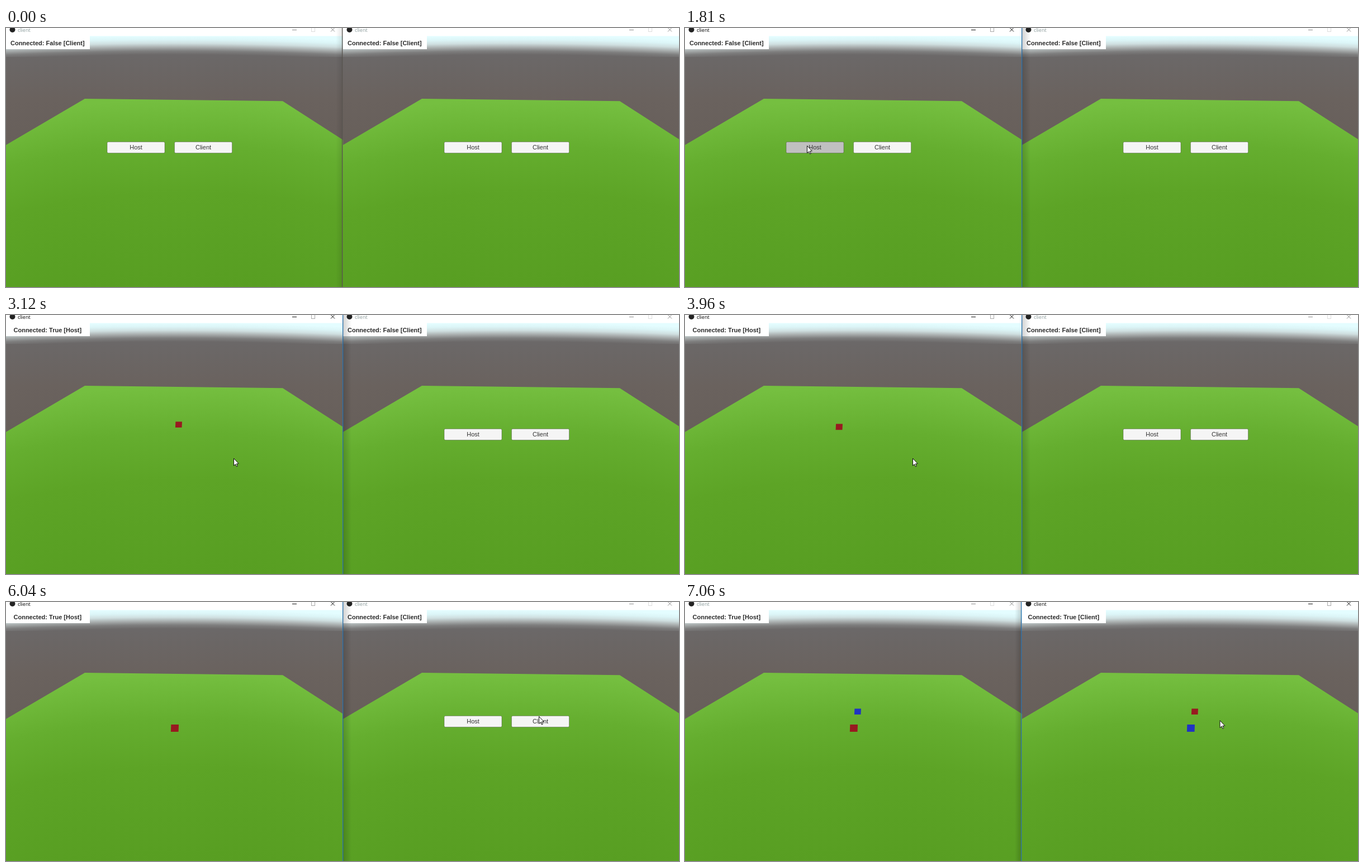
These frames come from a looping animation (1204 px wide and 465 px high, 8 s). An HTML page with a canvas:

```html
<!DOCTYPE html>
<html lang="en">
<head>
<meta charset="utf-8">
<title>Host and client</title>
<style>
html, body { margin: 0; width: 100%; height: 100%; overflow: hidden; }
canvas { display: block; }
</style>
</head>
<body>
<canvas id="stage" width="1204" height="465"></canvas>
<script>
const ctx = document.getElementById('stage').getContext('2d');
const LOOP = 8000, STEP = 77, PANE = 603, HEIGHT = 465;
const SANS = '"Liberation Sans", Arial, sans-serif';
const RED = '#981a20', BLUE = '#2034c2';
const SPAWN = { x: 309, y: 196.7 };

const clamp = v => Math.min(1, Math.max(0, v));
const progress = (t, from, to) => clamp((t - from) / (to - from));

// Runs the moves one after another; the point rests between them.
function travel(point, t, moves) {
  return moves.reduce((p, { from, to, x, y }) => {
    const f = progress(t, from, to);
    return { x: p.x + (x - p.x) * f, y: p.y + (y - p.y) * f };
  }, point);
}

const cursorAt = t => travel({ x: 662, y: 336 }, t, [
  { from: 270, to: 430, x: 220.5, y: 221 },
  { from: 500, to: 730, x: 218.5, y: 211.5 },
  { from: 2350, to: 2730, x: 935, y: 333 },
  { from: 2730, to: 3115, x: 407.5, y: 257.5 },
  { from: 5480, to: 6040, x: 953.5, y: 205.5 },
  { from: 6270, to: 6590, x: 957, y: 212.8 }
]);

const playerAt = t => travel(SPAWN, t, [
  { from: 3350, to: 4100, x: 268.6, y: 201.8 },
  { from: 4100, to: 4400, x: 256.5, y: 209 },
  { from: 4400, to: 5115, x: 291.3, y: 225 },
  { from: 5115, to: 5420, x: 302, y: 226.5 }
]);

function poly(points, fill) {
  ctx.beginPath();
  points.forEach(([x, y]) => ctx.lineTo(x, y));
  ctx.closePath();
  ctx.fillStyle = fill;
  ctx.fill();
}

function rect(x, y, w, h, fill) {
  ctx.fillStyle = fill;
  ctx.fillRect(x, y, w, h);
}

function text(str, x, y, font, color, align = 'center') {
  ctx.font = font;
  ctx.fillStyle = color;
  ctx.textAlign = align;
  ctx.fillText(str, x, y);
}

// Spreads the colours evenly over the gradient.
function shade(gradient, ...colors) {
  colors.forEach((c, i) => gradient.addColorStop(i / (colors.length - 1), c));
  return gradient;
}

// Arcs around a far centre give the slightly bent bands.
const rings = (x, y, near, far) => ctx.createRadialGradient(x, y, y - near, x, y, y - far);
const sky = shade(rings(300, 6448, 48, 14),
  '#6b6868', '#7e7e7e', '#a9aeae', '#cfdfe0', '#dcf5f7', '#e4fdff');
const ground = shade(ctx.createLinearGradient(0, 48, 0, 210), '#6b6868', '#6a625e', '#675f5a');
const grass = shade(rings(320, 1600, HEIGHT, 127),
  '#589e22', '#5aa124', '#5da426', '#65ae2f', '#75bf40');

function titleBar(active) {
  const ink = active ? '#111' : '#8c8c8c';
  rect(0, 0, PANE, 14.5, '#fff');
  ctx.beginPath();
  ctx.arc(11.5, 3, 5, 0, 2 * Math.PI);
  ctx.fillStyle = '#222';
  ctx.fill();
  text('client', 21, 6.5, '9px "Open Sans", sans-serif', active ? '#000' : '#8a9a9a', 'left');
  rect(512, 3, 8, 1, ink);
  ctx.lineWidth = 1;
  ctx.strokeStyle = active ? '#aaa' : '#ddd';
  ctx.strokeRect(546.5, -.5, 6, 7);
  ctx.strokeStyle = ink;
  ctx.beginPath();
  ctx.moveTo(581, -.5); ctx.lineTo(588, 6.5);
  ctx.moveTo(588, -.5); ctx.lineTo(581, 6.5);
  ctx.stroke();
}

function button(x, label, press) {
  const level = 245 - 53 * press;
  ctx.beginPath();
  ctx.roundRect(x, 204.5, 103, 20, 2);
  ctx.fillStyle = `rgb(${level},${level},${level})`;
  ctx.fill();
  ctx.strokeStyle = 'rgba(60,60,60,.5)';
  ctx.lineWidth = .8;
  ctx.stroke();
  text(label, x + 51.5, 218.4, '11px ' + SANS, '#323232');
}

// Cubes grow as they come nearer.
function cube({ x, y }, color) {
  const near = y - SPAWN.y, w = 6 + near * .035, h = 5.2 + near * .04;
  poly([[x - w + .4, y - h], [x + w, y - h], [x + w - .5, y + h], [x - w - .1, y + h]], color);
}

function pane(x, { active, status, connected, hostPress = 0, clientPress = 0, cubes }) {
  ctx.save();
  ctx.translate(x, 0);
  ctx.beginPath();
  ctx.rect(0, 0, PANE, HEIGHT);
  ctx.clip();
  rect(0, 0, PANE, 52, sky);
  rect(0, 52, PANE, 160, ground);
  poly([[0, 210], [141, 127], [495, 131.3], [PANE, 201], [PANE, HEIGHT], [0, HEIGHT]], grass);
  titleBar(active);
  rect(0, 14, 150, 24, '#fff');
  text('Connected: ' + status, 74.3, 30.5, 'bold 11px ' + SANS, '#2a2a2a');
  if (!connected) {
    button(181, 'Host', hostPress);
    button(301.5, 'Client', clientPress);
  }
  cubes.forEach(([at, color]) => cube(at, color));
  ctx.restore();
}

// The window in front drops a shadow on its neighbour.
function divider(leftActive, rightActive) {
  const x = leftActive ? 603 : 602, width = leftActive ? 15 : -12;
  const shadow = shade(ctx.createLinearGradient(x, 0, x + width, 0),
    `rgba(0,0,0,${leftActive || rightActive ? .18 : .1})`, 'rgba(0,0,0,0)');
  rect(x, 0, width, HEIGHT, shadow);
  rect(x - 1, 0, 1.3, HEIGHT, leftActive || rightActive ? '#2b71ab' : '#58544f');
}

function cursor({ x, y }) {
  const arrow = [[0, 0], [0, 13], [3, 10.3], [4.9, 14.6], [6.8, 13.8], [4.9, 9.6], [8.8, 9.4]];
  poly(arrow.map(([dx, dy]) => [x + dx, y + dy]), '#fff');
  ctx.strokeStyle = '#111';
  ctx.lineWidth = 1;
  ctx.stroke();
}

const pressed = (t, down, up) => progress(t, down, down + 100) - progress(t, up, up + 100);

function draw(t) {
  const tick = 270 + STEP * Math.floor((t - 250) / STEP);
  const hosting = t >= 1960, joined = t >= 6970;
  const leftActive = t >= 1580 && t < 6740, rightActive = t >= 6740;
  const player = playerAt(tick);
  const host = [player, RED], guest = [SPAWN, BLUE];

  pane(0, {
    active: leftActive, connected: hosting,
    cubes: joined ? [guest, host] : hosting ? [host] : [],
    status: hosting ? 'True [Host]' : 'False [Client]',
    hostPress: pressed(t, 1660, 1890)
  });
  pane(PANE, {
    active: rightActive, connected: joined,
    cubes: joined ? [[SPAWN, RED], [player, BLUE]] : [],
    status: joined ? 'True [Client]' : 'False [Client]',
    clientPress: pressed(t, 6740, 6900)
  });
  divider(leftActive, rightActive);
  if (t >= 270) cursor(cursorAt(tick));
}

const start = performance.now();
function frame() {
  draw((performance.now() - start) % LOOP);
  requestAnimationFrame(frame);
}
frame();
</script>
</body>
</html>
```
